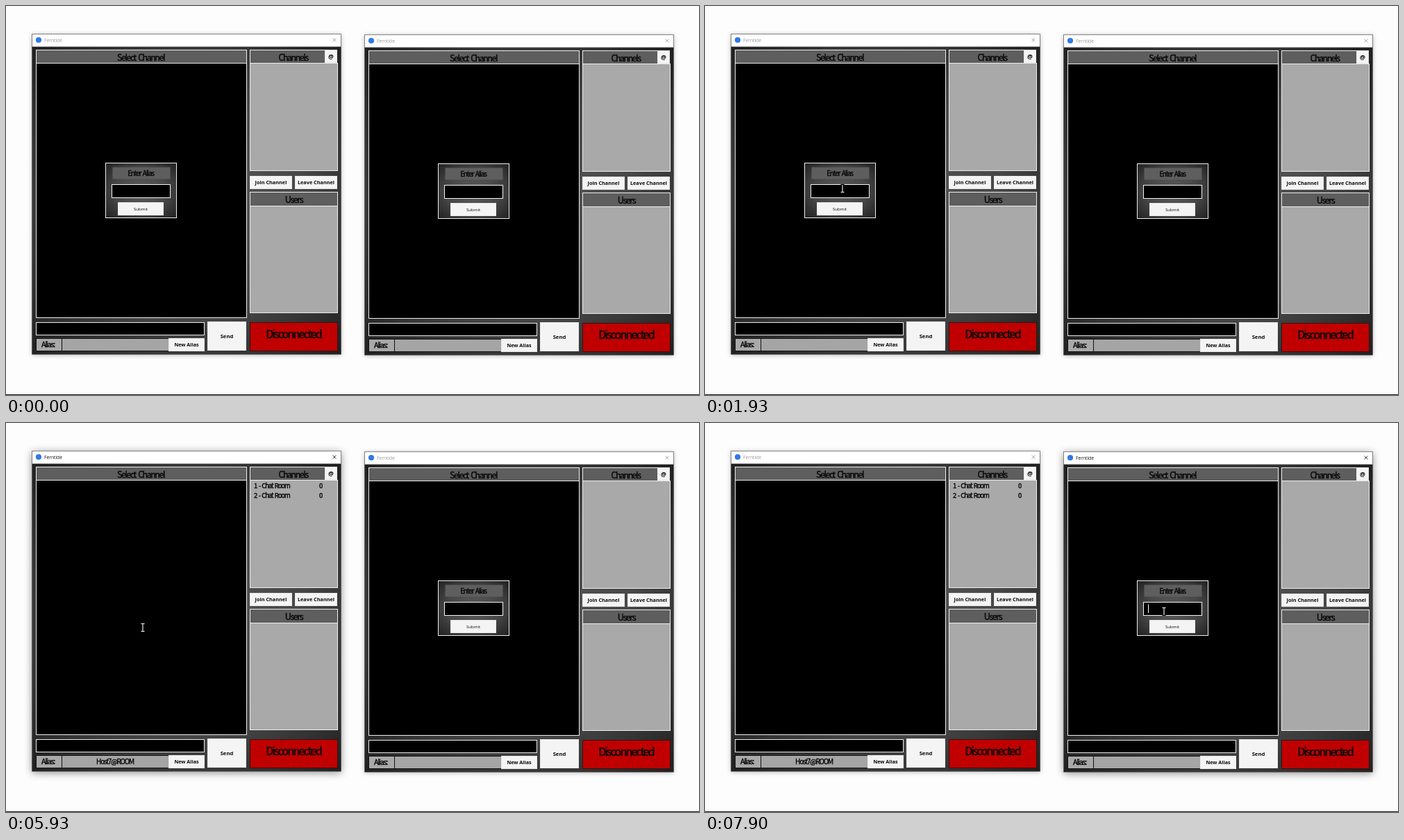
An HTML page that plays this animation: 998 px wide and 561 px high, repeating every 8 s.

```html
<!DOCTYPE html>
<html lang="en">
<head>
<meta charset="utf-8">
<title>Chat windows</title>
<style>
  html, body { margin: 0; width: 100%; height: 100%; overflow: hidden; background: #fdfdfd; }
  svg { display: block; width: 100vw; height: 100vh; }
  text { fill: #0a0a0a; }
  .narrow { font-family: "Noto Sans CJK JP", "Noto Sans CJK SC", "Noto Sans CJK", "Open Sans", sans-serif; letter-spacing: -.12em; word-spacing: .16em; stroke: #0a0a0a; stroke-width: .4px; }
  .ui { font-family: "Open Sans", "Noto Sans", sans-serif; }
  .bold { font-weight: 700; }
  .mid { text-anchor: middle; }
  .typed { fill: #f2f2f2; stroke: none; }
  .frame { filter: drop-shadow(0 1px 3px rgba(0,0,0,.3)); }
  .active .frame { filter: drop-shadow(0 2px 6px rgba(0,0,0,.45)); }
  .title { fill: #999; }
  .close { stroke: #999; stroke-width: .8; fill: none; }
  .active .title { fill: #111; }
  .active .close { stroke: #111; }
  #beam { mix-blend-mode: difference; }
</style>
</head>
<body>
<svg id="stage" viewBox="0 0 998 561">
  <defs>
    <radialGradient id="metal" cx=".5" cy=".5" r=".7">
      <stop offset="0" stop-color="#5c5c5c"/>
      <stop offset=".55" stop-color="#464646"/>
      <stop offset="1" stop-color="#212121"/>
    </radialGradient>
  </defs>
  <rect width="998" height="561" fill="#fdfdfd"/>
  <rect y="560" width="998" height="1" fill="#161a12"/>
  <g id="windows"></g>
  <path id="beam" d="M-2.5-5.5h2l.5.5.5-.5h2M0-5V5M-2.5 5.5h2l.5-.5.5.5h2" fill="none" stroke="#fff" stroke-width="1.1"/>
  <path id="arrow" d="M0 0v11l2.6-2.4 1.8 4 1.7-.8-1.8-3.8h3.5z" fill="#fff" stroke="#111" stroke-width=".7"/>
</svg>
<script>
const LOOP = 8000;
const ALIAS = "Host7";
const $ = id => document.getElementById(id);

const box = (x, y, x2, y2, fill, stroke = "none") =>
  `<rect x="${x + .5}" y="${y + .5}" width="${x2 - x - 1}" height="${y2 - y - 1}" fill="${fill}" stroke="${stroke}"/>`;
const label = (text, x, y, size, cls = "narrow mid") =>
  `<text class="${cls}" x="${x}" y="${y}" font-size="${size}">${text}</text>`;
const button = (text, x, y, x2, y2, size = 7.3, weight = "bold") =>
  box(x, y, x2, y2, "#f4f4f4", "#e8e8e8") +
  label(text, (x + x2) / 2, (y + y2) / 2 + size * .37, size, `ui mid ${weight}`);

const dialog = () => `<g class="dialog">
  ${box(143, 226, 246, 306, "url(#metal)", "#eee")}
  ${box(153, 232, 237, 250, "#5e5e5e")}
  ${label("Enter Alias", 194, 244.8, 10)}
  ${box(152, 257, 237, 277, "#000", "#f4f4f4")}
  ${label("", 159, 270.7, 9.8, "narrow typed")}
  <rect class="caret" x="159" y="260.5" width="1" height="12.5" fill="#fff"/>
  ${button("Submit", 161, 283, 227, 302, 6.1, "")}
</g>`;

const rooms = () => `<g class="rooms">${[1, 2].map(n =>
  label(`${n} - Chat Room`, 357, 80 + 14 * n, 9.5, "narrow") +
  label("0", 453, 80 + 14 * n, 9.5)).join("")}
  ${label(ALIAS + "@ROOM", 157, 491.7, 10)}</g>`;

const chatWindow = (id, dx, dy) => `<g id="${id}" transform="translate(${dx} ${dy})">
  <rect class="frame" x="37.5" y="40.3" width="445" height="462" fill="#222"/>
  <rect x="37.5" y="40.3" width="445" height="18.5" fill="#fff"/>
  <rect x="37.5" y="58.8" width="445" height="443.5" fill="url(#metal)"/>
  <rect x="37.5" y="40.3" width="445" height="462" fill="none" stroke="#666" stroke-width=".7"/>
  <circle cx="47" cy="49" r="4.1" fill="#2f79e6"/>
  ${label("Ferntide", 55, 51.5, 6.7, "ui title")}
  <path class="close" d="M470.5 46.5l5 5m0-5l-5 5"/>
  ${box(43, 63, 347, 83, "#5e5e5e", "#eee")}
  ${label("Select Channel", 194, 78.8, 12.5)}
  ${box(43, 82, 347, 450, "#000", "#eee")}
  ${box(351, 63, 460, 83, "#5e5e5e", "#eee")}
  ${label("Channels", 413.5, 78.8, 12.5)}
  ${box(351, 82, 478, 238, "#a9a9a9", "#eee")}
  ${button("@", 459, 63, 477, 82, 8.8)}
  ${button("Join Channel", 351, 245, 412, 264)}
  ${button("Leave Channel", 416, 245, 477, 264)}
  ${box(351, 268, 478, 289, "#5e5e5e", "#eee")}
  ${label("Users", 414.5, 284.4, 12.7)}
  ${box(351, 288, 478, 443, "#a9a9a9", "#eee")}
  ${box(43, 456, 286, 475, "#000", "#eee")}
  ${box(43, 479, 81, 498, "#a9a9a9", "#111")}
  ${label("Alias:", 60.5, 491.7, 10.7)}
  ${box(80, 479, 235, 498, "#a5a5a5", "#111")}
  ${button("New Alias", 234, 479, 286, 498, 7.2)}
  ${button("Send", 290, 455, 346, 497, 7.7)}
  ${box(351, 456, 478, 498, "#c00000", "#3a1010")}
  ${label("Disconnected", 414, 478.8, 16.3)}
  ${rooms()}${dialog()}
</g>`;

$("windows").innerHTML = chatWindow("left", 0, 0) + chatWindow("right", 479, 1);
const left = $("left"), right = $("right");
const typed = left.querySelector(".typed");
const leftCaret = left.querySelector(".caret");
const rightCaret = right.querySelector(".caret");

const show = (el, on) => el.setAttribute("visibility", on ? "inherit" : "hidden");

const FOCUS = 2100, SUBMIT = 5890, SWITCH = 7700;
const KEYS = [2700, 2870, 3040, 3220, 3600];

// Pointer stops: time, x, y
const PATH = [
  [1700, 262, 332], [1900, 198, 263], [4170, 198, 263], [4930, 229, 209],
  [5170, 276, 158], [5330, 272, 170], [5740, 197, 295], [6250, 197, 295],
  [6930, 347, 232], [7500, 655, 268], [7650, 661, 272], [LOOP, 661, 272]
];

function pointerAt(t) {
  const i = PATH.findIndex(p => p[0] > t);
  if (i < 1) return null;
  const [t0, x0, y0] = PATH[i - 1], [t1, x1, y1] = PATH[i];
  const k = (t - t0) / (t1 - t0), e = k * k * (3 - 2 * k);
  return { x: x0 + (x1 - x0) * e, y: y0 + (y1 - y0) * e };
}

function isBeam({ x, y }, dialogOpen) {
  if (dialogOpen && x > 161 && x < 227 && y > 283 && y < 302) return false;
  return x < 348 || (x > 521 && x < 826);
}

const blinkOn = (t, since) => Math.floor((t - since) / 530) % 2 === 0;

function render(t) {
  const count = KEYS.filter(k => k <= t).length;
  const open = t < SUBMIT;
  left.classList.toggle("active", t >= FOCUS && t < SWITCH);
  right.classList.toggle("active", t >= SWITCH);

  typed.textContent = ALIAS.slice(0, count);
  const end = count ? typed.getComputedTextLength() + 1 : 0;
  leftCaret.setAttribute("x", 159 + end);
  show(leftCaret, open && t >= FOCUS && blinkOn(t, count ? KEYS[count - 1] : FOCUS));
  show(rightCaret, t >= SWITCH);
  show(left.querySelector(".dialog"), open);
  show(left.querySelector(".rooms"), !open);
  show(right.querySelector(".rooms"), false);

  const hidden = t >= KEYS[0] && t < 4170;
  const p = hidden ? null : pointerAt(t);
  const beam = p && isBeam(p, open);
  show($("beam"), beam);
  show($("arrow"), p && !beam);
  if (p) $(beam ? "beam" : "arrow").setAttribute("transform", `translate(${p.x} ${p.y})`);
}

const start = performance.now();
function tick() {
  render((performance.now() - start) % LOOP);
  requestAnimationFrame(tick);
}
tick();
</script>
</body>
</html>
```
